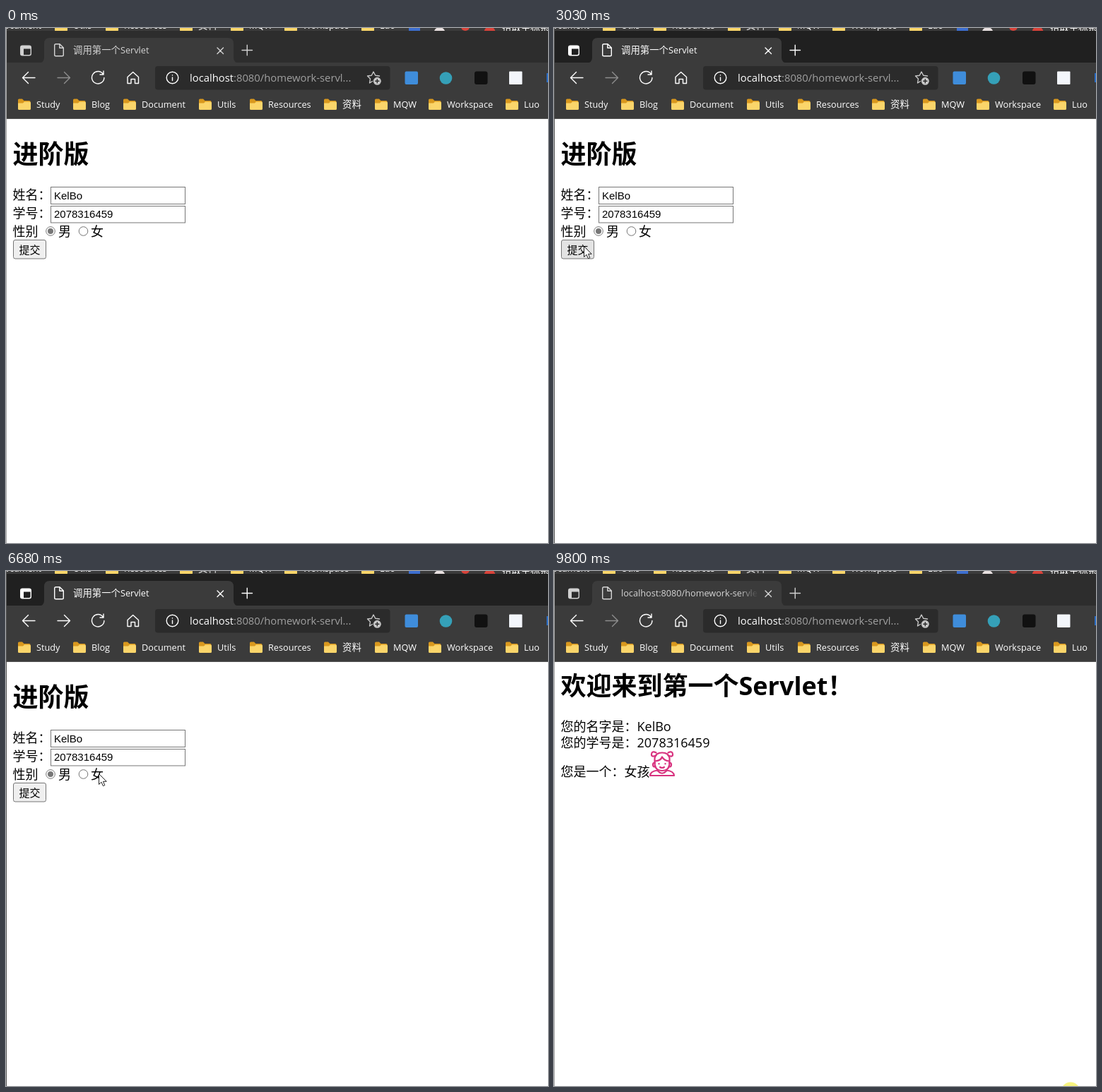
These frames come from a looping animation (767x730 px, 9860 ms). An HTML page:

```html
<!DOCTYPE html>
<html lang="zh-CN">
<head>
<meta charset="utf-8">
<title>Servlet</title>
<style>
html, body { margin: 0; width: 100%; height: 100%; overflow: hidden; background: #fff; }
svg { display: block; }
text { font-family: "Open Sans", "Noto Sans CJK SC", "Noto Sans CJK", sans-serif; white-space: pre; }
.ui { font-size: 12.7px; fill: #fff; }
.cjk { font-size: 13.4px; }
.page { font-size: 18px; }
.h1 { font-size: 36px; font-weight: 700; }
.field { font-family: "Liberation Sans", Arial, sans-serif; font-size: 15px; }
.line { fill: none; stroke: #fff; stroke-width: 1.4; stroke-linecap: round; stroke-linejoin: round; }
.box { fill: #fff; stroke: #767676; }
.art { fill: none; stroke-width: 2.2; stroke-linecap: round; stroke-linejoin: round; }
</style>
</head>
<body>
<svg width="767" height="730" viewBox="0 0 767 730">
  <defs>
    <linearGradient id="fade" gradientUnits="userSpaceOnUse" x1="262" y1="0" x2="289" y2="0">
      <stop offset="0" stop-color="#fff"/><stop offset="1" stop-color="#fff" stop-opacity="0"/>
    </linearGradient>
    <clipPath id="top"><path d="M0 0H767V4H0Z"/></clipPath>
    <g id="folder">
      <path d="M0 1.5Q0 0 1.5 0H6L8.5 2.5H16Q17.5 2.5 17.5 4V14H0Z" fill="#d9981e"/>
      <path d="M0 6H7L9 4H16.5Q18 4 18 5.5V14Q18 15.5 16.5 15.5H1.5Q0 15.5 0 14Z" fill="#fbd56a"/>
    </g>
  </defs>

  <rect width="767" height="730" fill="#fff"/>
  <rect width="767" height="13" fill="#3b3b3b"/>

  <!-- window behind -->
  <g clip-path="url(#top)">
    <g id="behind" transform="translate(-204 -111.5)"></g>
    <rect x="570" y="-11" width="16" height="15" fill="#3d6fd0"/>
    <circle cx="613.5" cy="7" r="8" fill="#e8e0e0"/>
    <circle cx="650" cy="-2" r="6" fill="#d9433a"/>
    <circle cx="684.5" cy="6" r="8" fill="#d9433a"/>
    <text class="ui cjk" x="702" y="4">拾取坐标系</text>
  </g>

  <!-- tab strip -->
  <rect id="strip" y="4" width="767" height="46"/>
  <path d="M46 50Q54 49 54 42V22Q54 14 62 14H314Q322 14 322 22V42Q322 49 330 50Z" fill="#3b3b3b"/>
  <rect y="49" width="767" height="79" fill="#3b3b3b"/>
  <rect y="128" width="767" height="1" fill="#555"/>
  <g id="tabs">
    <rect class="line" x="20.7" y="25.2" width="14.6" height="13.6" rx="2.5"/>
    <path d="M21 25.5H35V29.5H25V38H21Z" fill="#fff"/>
    <path id="doc" class="line" d="M70.5 22.7H76L81.3 28V38Q81.3 39.8 79.5 39.8H70.5Q68.7 39.8 68.7 38V24.5Q68.7 22.7 70.5 22.7ZM75.8 23V28.3H81"/>
    <g id="spin" fill="#62b0e8">
      <circle cx="68.5" cy="27.5" r="1.4"/><circle cx="68.5" cy="33.5" r="1.4"/>
    </g>
    <text id="formTitle" class="ui" x="95" y="36"><tspan class="cjk">调用第一个</tspan>Servlet</text>
    <text id="urlTitle" class="ui" x="95" y="36" style="fill:url(#fade)">localhost:8080/homework-servle</text>
    <path class="line" d="M299 28L307.500 36.500M307.500 28L299 36.500M334 31.500H348.500M341.250 24.250V38.750"/>
  </g>

  <!-- toolbar -->
  <rect id="backHover" x="10" y="54" width="45" height="33" rx="3" fill="#474747"/>
  <path class="line" d="M41 70.500H23.500M31.500 62.500L23.500 70.500L31.500 78.500"/>
  <path id="next" class="line" d="M73 70.500H90.500M82.500 62.500L90.500 70.500L82.500 78.500"/>
  <path id="reload" class="line" d="M137.500 65.500A8.700 8.700 0 1 0 138.900 70.500M138 61V66H133"/>
  <path id="stop" class="line" d="M123.500 64L137 77.500M137 64L123.500 77.500"/>
  <path class="line" d="M172 69.500L179.700 62.500L187.500 69.500V78.500H182.500V72.500H177V78.500H172Z"/>
  <rect x="211" y="54" width="332.500" height="33.500" rx="4" fill="#2b2b2b"/>
  <circle class="line" cx="235.500" cy="70.500" r="8.300"/>
  <path class="line" d="M235.500 70V74.500M235.500 66.800V67"/>
  <text x="260" y="76" font-size="14.8" fill="#a0a0a0"><tspan fill="#fff">localhost</tspan>:8080/homework-servl...</text>
  <g class="line" style="stroke:#c8c8c8">
    <path d="M518.500 75.500L514.500 78L515.500 72L511.500 68L517.300 67.200L520 62L522.700 67.200L528.500 68"/>
    <circle cx="525.300" cy="75.300" r="4.800" fill="#c8c8c8"/>
    <path d="M522.800 75.300H527.800M525.300 72.800V77.800" stroke="#2b2b2b"/>
  </g>
  <rect x="564.500" y="61.500" width="18.500" height="18.500" rx="2" fill="#3f8ddb"/>
  <circle cx="622.500" cy="71" r="8.800" fill="#35a0b8"/>
  <rect x="663" y="61.500" width="18.500" height="18.500" rx="3" fill="#111"/>
  <rect x="712" y="61.500" width="18.500" height="18.500" rx="1" fill="#f3f6fb"/>
  <rect x="765" y="64" width="2" height="13" fill="#2b6cc4"/>
  <g id="marks"></g>

  <!-- form page -->
  <g id="form">
    <text class="h1" x="9.500" y="192">进阶版</text>
    <g class="page">
      <text class="page" x="9.500" y="243">姓名：</text>
      <text class="page" x="9.500" y="268.500">学号：</text>
      <text class="page" x="9.500" y="295">性别</text>
      <text class="page" x="74" y="295">男</text>
      <text class="page" x="120" y="295">女</text>
    </g>
    <rect class="box" x="63.500" y="225.500" width="190" height="24"/>
    <rect class="box" x="63.500" y="252.500" width="190" height="23.500"/>
    <text class="field" x="68" y="242.500">KelBo</text>
    <text class="field" x="68" y="268.500">2078316459</text>
    <circle class="box" cx="63" cy="288" r="6.300"/>
    <circle class="box" cx="109.500" cy="288" r="6.300"/>
    <circle id="dot" cy="288" r="4" fill="#767676"/>
    <rect id="submit" x="10.500" y="300.500" width="46" height="26.500" rx="2.500" stroke="#767676"/>
    <text x="18.500" y="319.500" font-size="15">提交</text>
  </g>

  <!-- result page -->
  <g id="result">
    <text class="h1" x="9.500" y="175.500">欢迎来到第一个Servlet！</text>
    <text class="page" x="9.500" y="227">您的名字是：KelBo</text>
    <text class="page" x="9.500" y="250">您的学号是：2078316459</text>
    <text class="page" x="9.500" y="290.500">您是一个：<tspan id="kid"></tspan></text>
    <g id="boy" class="art" stroke="#4f9ce6">
      <path d="M139.500 267V264Q140 256 151 256T162 263.500H169.500V268H158Q150 261.500 139.500 267"/>
      <path d="M146 264Q146 258.500 151 260.500"/>
      <path d="M140 268Q137 269 138 272T141 274.500Q143 283 151.500 283T162 274.500Q165.500 274 165 271.500T162.500 268.500"/>
      <path d="M146.500 272V272.500M156 272V272.500M147.500 277.500Q151.500 280.500 155.500 277.500"/>
      <path d="M146 282.500Q136.500 284 136.300 290H166.500Q166 284 157 282.500"/>
    </g>
    <g id="girl" class="art" stroke="#d8337f">
      <path d="M142.500 265Q144 257.500 153 257.500T163.500 265V273Q163 283 153 283T142.500 273Z"/>
      <path d="M143 269.500Q151 269 153 263.500Q156 269 163 269.500"/>
      <path d="M144.500 261.500Q137.500 264.500 138 259.500T144.500 257.500M161.500 261.500Q168.500 264.500 168 259.500T161.500 257.500M143 272Q139.500 271.500 140 275T143.500 277M163 272Q166.500 271.500 166 275T162.500 277"/>
      <path d="M148.500 273V273.500M157.500 273V273.500M150 278Q153 280 156 278"/>
      <path d="M147 282.500Q136.500 283.500 136 290H170Q169.500 283.500 159 282.500M147 283.500Q153 290 159 283.500"/>
    </g>
  </g>

  <g id="tip">
    <rect x="38.500" y="82.500" width="294" height="29" fill="#2b2b2b" stroke="#666"/>
    <text class="ui" x="46" y="102">单击可返回，按住可查看历史记录 (Alt+向左键)</text>
  </g>
  <rect id="edge" width="1" height="730"/>

  <g id="pointer">
    <circle id="halo" r="13.500" cy="1" fill="#f5ee3c" opacity=".65"/>
    <path id="arrow" d="M.5 .5V15.500L4 12.200L6.400 17.700L8.800 16.700L6.500 11.300H11.200Z" fill="#fff" stroke="#222"/>
    <path id="beam" d="M-3 -8H-1L0 -7L1 -8H3M0 -7V7M-3 8H-1L0 7L1 8H3" fill="none" stroke="#222"/>
  </g>
</svg>
<script>
const LOOP = 9860;
const $ = id => document.getElementById(id);
const show = (id, on) => $(id).style.display = on ? '' : 'none';
const set = (id, name, value) => $(id).setAttribute(name, value);
const within = (t, a, b) => t >= a && t < b;

const bookmarks = { Study: 17, Blog: 95, Document: 166, Utils: 273, Resources: 345,
  资料: 450, MQW: 522, Workspace: 598, Luo: 707 };
$('marks').innerHTML = $('behind').innerHTML = Object.entries(bookmarks).map(([name, x]) =>
  `<use href="#folder" x="${x}" y="100.500"/>
   <text class="ui${name === '资料' ? ' cjk' : ''}" x="${x + 26}" y="112.500">${name}</text>`).join('');

// pointer path: time, x, y
const path = [
  [140, 679, 687], [1040, 108, 287], [1400, 108, 287], [1700, 73, 287], [1910, 73, 287],
  [2120, 122, 287], [2330, 122, 287], [2600, 73, 287], [2750, 73, 287], [3130, 36, 313],
  [3310, 36, 313], [3640, 90, 306], [4170, 90, 306], [4850, 37, 64], [5440, 37, 64],
  [5720, 95, 232], [6340, 122, 283], [6470, 122, 283], [6610, 131, 287], [6820, 131, 287],
  [7150, 36, 313], [7290, 36, 313], [7430, 80, 327], [7770, 114, 339], [8380, 114, 339],
  [9320, 700, 652], [9390, 700, 652], [9530, 731, 737], [LOOP, 731, 737]
];
const clicks = [1170, 1770, 2190, 2670, 3240, 5370, 6750, 7220, 9730];

function pointerAt(t) {
  const i = Math.max(1, path.findIndex(p => p[0] > t));
  const [t0, x0, y0] = path[i - 1], [t1, x1, y1] = path[i];
  const u = Math.max(0, (t - t0) / (t1 - t0)), k = u * u * (3 - 2 * u);
  return [x0 + (x1 - x0) * k, y0 + (y1 - y0) * k];
}

function draw(t) {
  const active = within(t, 1170, 9800);
  const form = t < 3500 || within(t, 5790, 7500);
  const busy = within(t, 3310, 3500) || within(t, 5510, 5790) || within(t, 7290, 7500);
  const returned = within(t, 5510, 7500);
  const girl = within(t, 1240, 1840) || within(t, 2260, 2740) || t >= 6820;
  const [x, y] = pointerAt(t);
  const beam = x < 255 && within(y, 145, 277);

  set('strip', 'fill', active ? '#202020' : '#2d2d2d');
  set('tabs', 'opacity', active ? 1 : .78);
  set('edge', 'fill', active ? '#555' : '#aaa');

  show('formTitle', t < 3500 || returned);
  show('urlTitle', t >= 3500 && !returned);
  show('doc', !busy);
  show('spin', busy);
  set('spin', 'transform', `rotate(${(t - 5720) * .36} 75 30.500)`);
  show('reload', !busy);
  show('stop', busy);
  show('backHover', within(t, 4800, 5790));
  set('next', 'opacity', returned ? 1 : .42);
  show('tip', within(t, 5110, 5370));

  show('form', form);
  show('result', !form);
  set('dot', 'cx', girl ? 109.5 : 63);
  const over = within(x, 10, 57) && within(y, 300, 327);
  set('submit', 'fill', over ? '#e3e3e3' : '#efefef');
  show('boy', !girl);
  show('girl', girl);
  $('kid').textContent = girl ? '女孩' : '男孩';

  show('pointer', t >= 140);
  set('pointer', 'transform', `translate(${Math.round(x)} ${Math.round(y)})`);
  show('halo', clicks.some(c => within(t, c, c + 140)));
  show('arrow', !beam);
  show('beam', beam);
}

const start = performance.now();
function tick() {
  draw((performance.now() - start) % LOOP);
  requestAnimationFrame(tick);
}
tick();
</script>
</body>
</html>
```
